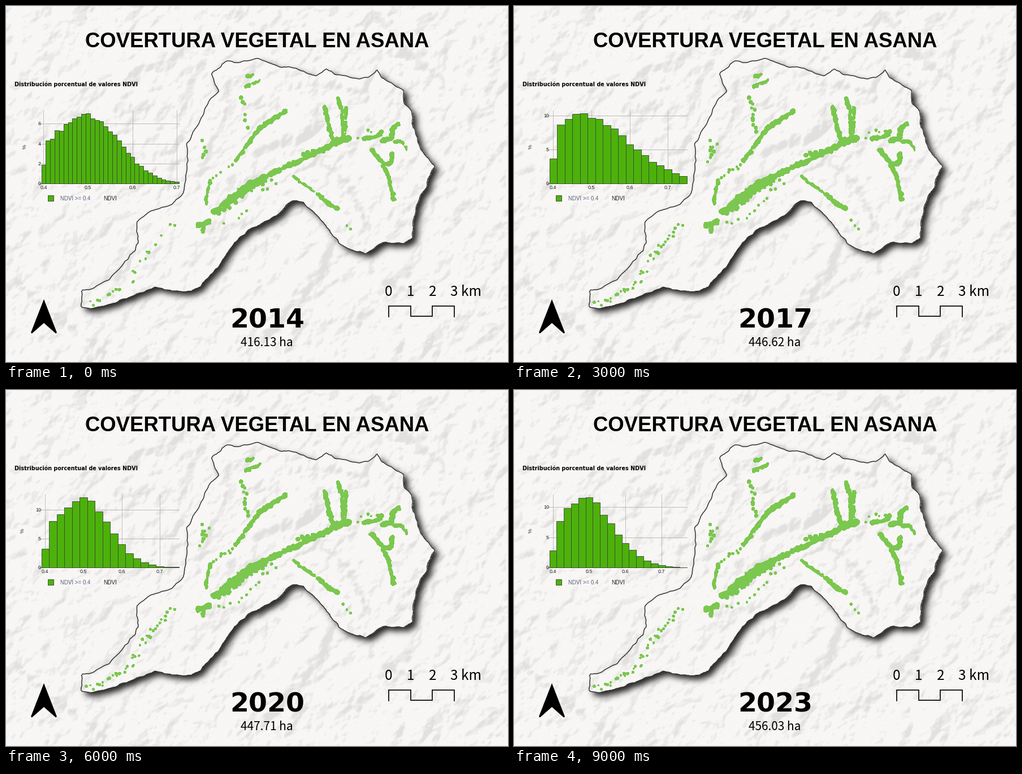
Write a matplotlib script that moves like this. It is 888 px wide and 630 px high and loops after 10000 ms.

```python
import numpy as np
import matplotlib.pyplot as plt
from matplotlib.animation import FuncAnimation
from matplotlib.path import Path
from matplotlib.patches import Polygon, Rectangle

W, H, DPI = 888, 630, 100
PT = 72 / DPI
rng = np.random.default_rng(14)
yy, xx = np.mgrid[0:H, 0:W] + 0.5
fy = np.fft.fftfreq(H)[:, None]
fx = np.fft.fftfreq(W)[None, :]

fig = plt.figure(figsize=(W / DPI, H / DPI), dpi=DPI)
ax = fig.add_axes([0, 0, 1, 1])
ax.set_xlim(0, W)
ax.set_ylim(H, 0)
ax.axis("off")


def text(x, y, s, px, ha="center", font="DejaVu Sans", **kw):
    kw.setdefault("va", "baseline")
    return ax.text(x, y, s, fontsize=px * PT, ha=ha, family=font, **kw)


def line(xs, ys, color="black", px=1.0, **kw):
    return ax.plot(xs, ys, color=color, lw=px * PT, **kw)[0]


def apply(a, gain):
    return np.fft.ifft2(np.fft.fft2(a) * gain).real


def blur(a, sigma):
    return apply(a, np.exp(-2 * (np.pi * sigma) ** 2 * (fx**2 + fy**2)))


def noise(gain):
    n = apply(rng.standard_normal((H, W)), gain)
    return (n - n.mean()) / n.std()


def soft_noise(sigma):
    return noise(np.exp(-2 * (np.pi * sigma) ** 2 * (fx**2 + fy**2)))


def along(pts, step=1.0):
    """Resample a polyline at even steps."""
    p = np.array(pts, float)
    s = np.r_[0, np.cumsum(np.hypot(*np.diff(p, axis=0).T))]
    t = np.arange(0, s[-1], step)
    return np.column_stack([np.interp(t, s, c) for c in p.T])


def stamp(field, x, y, r):
    """Raise field to r minus the distance from (x, y)."""
    m = int(r + 8)
    x0, y0 = int(x), int(y)
    win = np.s_[max(y0 - m, 0):max(y0 + m, 0), max(x0 - m, 0):max(x0 + m, 0)]
    d = np.hypot(xx[win] - x, yy[win] - y)
    field[win] = np.maximum(field[win], r - d)


# ---------- relief ----------
def relief():
    fd, fp = (fx - fy) / 2**0.5, (fx + fy) / 2**0.5
    f = np.sqrt((1.3 * fd) ** 2 + fp**2) + 0.006
    height = -np.abs(noise(f**-2.3)) - 0.5 * np.abs(noise(f**-2.1))
    gy, gx = np.gradient(blur(height, 1.3))
    shade = gx + gy
    shade /= shade.std()
    valley = np.zeros((H, W))
    for path in (
        [(345, 100), (318, 155), (240, 225)],
        [(312, 235), (285, 290), (180, 340)],
        [(392, 125), (390, 190), (350, 265), (340, 320)],
        [(250, 400), (215, 460), (150, 495)],
        [(520, 155), (560, 135), (620, 150)],
        [(575, 180), (545, 225), (440, 260), (395, 310)],
        [(560, 280), (600, 310), (640, 390)],
        [(570, 440), (530, 510), (495, 625)],
        [(640, 450), (655, 480), (720, 510)],
        [(650, 10), (700, 80), (770, 130)],
        [(20, 490), (90, 550), (170, 610)],
    ):
        for x, y in along(path, 3):
            stamp(valley, x, y, 11)
    v = shade + 0.16 * valley
    tones = np.array([248, 242, 235, 226])
    img = blur(tones[np.digitize(v, [0.5, 1.0, 1.9])], 0.5)
    warm = np.array([0, 1, 2.5])
    return (img[..., None] - warm) / 255


# ---------- basin ----------
outline = [
    (363, 121), (390, 97), (405, 100), (446, 93), (488, 110), (500, 107),
    (549, 124), (567, 111), (582, 121), (622, 129), (646, 124), (656, 112),
    (665, 127), (703, 148), (704, 172), (718, 185), (718, 207), (734, 254),
    (758, 284), (746, 305), (745, 318), (732, 337), (721, 375), (718, 411),
    (705, 420), (667, 418), (637, 438), (605, 430), (590, 421), (555, 376),
    (526, 348), (513, 343), (500, 350), (480, 370), (430, 396), (405, 418),
    (375, 462), (343, 497), (327, 505), (300, 506), (264, 498), (195, 524),
    (150, 536), (133, 533), (135, 503), (150, 501), (183, 484), (229, 432),
    (234, 418), (231, 383), (255, 363), (292, 352), (313, 333), (321, 285),
    (320, 245), (350, 190), (360, 165), (377, 152), (363, 121),
]
edge = along(outline, 3)
wobble = rng.standard_normal(edge.shape)
edge += 0.35 * (wobble + np.roll(wobble, 1, 0) + np.roll(wobble, 2, 0))
inside = Path(edge).contains_points(
    np.column_stack([xx.ravel(), yy.ravel()])).reshape(H, W)
shadow = np.roll(blur(inside.astype(float), 5.5), (7, 7), (0, 1))
shadow = (np.clip(shadow * 1.05, 0, 0.95) * ~inside)[..., None]
land = relief() * (1 - shadow) + 0.17 * shadow
ax.imshow(land.clip(0, 1), extent=(0, W, H, 0), interpolation="nearest",
          aspect="auto")
ax.add_patch(Polygon(edge, fill=False, ec="#333333", lw=1.5 * PT,
                     joinstyle="round"))

# ---------- vegetation ----------
cover = np.full((H, W), -9.0)
dots = []


def stroke(r, *pts):
    for x, y in along(pts):
        stamp(cover, x, y, r)


def scatter(n, spread, *path, size=2.0):
    """Dots near a path, each with the density at which it shows."""
    p = along(path)
    for k, t in enumerate(rng.permutation(n) / n):
        x, y = p[int((k + 0.5) / n * len(p))] + rng.normal(0, spread, 2)
        dots.append((x, y, size * rng.uniform(0.7, 1.3), t))


# main valley
stroke(4.5, (339, 388), (360, 382))
stroke(3, (350, 390), (349, 399))
stroke(4.5, (368, 366), (400, 338), (430, 314), (485, 290), (530, 269), (575, 247))
stroke(6, (388, 352), (412, 332), (450, 308))
stroke(6, (578, 242), (604, 234))
scatter(16, 2, (375, 366), (405, 352), (425, 330), (470, 304), size=3.2)
scatter(6, 2, (515, 265), (550, 254), size=3.4)
# north fingers
stroke(4, (564, 180), (571, 210), (578, 238))
stroke(3, (588, 164), (595, 190), (597, 230))
stroke(3, (602, 181), (600, 225))
# east
stroke(3, (632, 235), (658, 231), (664, 222))
stroke(4, (666, 238), (682, 235), (684, 218), (693, 209))
stroke(2, (688, 239), (702, 242), (709, 255))
stroke(3.5, (648, 255), (669, 281), (682, 278), (683, 260))
stroke(3.2, (669, 285), (677, 305), (686, 343))
# south-east and north-west branches
stroke(2, (508, 302), (531, 318), (557, 337))
stroke(4, (560, 340), (574, 352), (587, 358))
stroke(3.6, (406, 274), (434, 235), (450, 214), (495, 186))
stroke(2.6, (424, 142), (449, 133))
stroke(3, (427, 126), (436, 122))
stroke(2.2, (361, 309), (356, 330), (354, 352))
# scattered patches
scatter(3, 1, (592, 375), (612, 399), size=2.4)
scatter(40, 3, (140, 526), (186, 510), (222, 487), (246, 442), (298, 386))
scatter(10, 4, (352, 238), (347, 270), (364, 240), size=2.5)
scatter(11, 2, (416, 160), (422, 190), (428, 225), size=3)
scatter(9, 2, (362, 307), (383, 293), (403, 280))
scatter(13, 4, (365, 388), (420, 366), (475, 312))
scatter(8, 3, (620, 232), (655, 214), (668, 240))

grain = 0.9 * soft_noise(1.8)


def vegetation(area):
    field = cover + grain + 0.25 * soft_noise(2) + (area - 430) / 80
    for x, y, r, t in dots:
        if t < (area - 380) / 70:
            stamp(field, x, y, r)
    win = np.s_[112:545, 125:715]
    return ax.contourf(xx[win], yy[win], field[win], levels=[0, 60],
                       colors=["#7bc74f"], zorder=2)


# ---------- histogram ----------
X0, X1, Y0, TOP = 62.5, 306, 314, 184
GRID, BAR, RIM = "#b4b4b4", "#4db10c", "#3c4a36"


def spread_of(bins, peak, mode, rise, fall, power):
    """Skewed bell over the bins; the first bin is only half covered."""
    d = np.arange(bins) / bins - mode
    bell = np.where(d < 0, np.exp(-(np.abs(d) / rise) ** 2),
                    np.exp(-(np.abs(d) / fall) ** power))
    bell *= rng.uniform(0.95, 1.05, bins)
    bell[0] /= 2
    return bell * peak / bell.max()


def chart(vals):
    small = dict(px=9, font="Liberation Sans", color="#222222")
    out = []
    n, peak = len(vals), vals.max()
    w, unit = (X1 - X0) / n, 124 / peak
    step = 2 if peak < 10 else 5
    per_tenth = 10 if n > 25 else 5
    for k in range(0, n, per_tenth):
        x = X0 + w * (k + 0.5)
        out.append(line([x, x], [TOP, Y0], GRID, 0.8))
        out.append(text(x, 324, f"{0.4 + k / per_tenth / 10:.1f}", **small))
    for v in range(0, int(peak) + 1, step):
        y = Y0 - v * unit
        out.append(line([X0 - 4, X1], [y, y], GRID if v else "#444444", 0.9))
        out.append(text(62, y + 3, str(v), ha="right", **small))
    for k, v in enumerate(vals):
        out.append(ax.add_patch(Rectangle(
            (X0 + k * w, Y0 - v * unit), w, v * unit, fc=BAR, ec=RIM,
            lw=0.9 * PT, zorder=3)))
    out.append(text(33 if step == 2 else 29, 249, "%", rotation=90,
                    va="center", **small))
    return out


# hectares, then bins, peak, mode, rise, fall, power of the histogram
years = [
    (416.13, 31, 7.05, 0.32, 0.42, 0.33, 2),
    (430.25, 18, 10.7, 0.17, 0.26, 0.45, 2),
    (444.36, 18, 10.85, 0.17, 0.26, 0.46, 2),
    (446.62, 18, 10.3, 0.20, 0.35, 0.50, 2),
    (448.87, 18, 9.25, 0.24, 0.70, 0.46, 2.3),
    (405.85, 17, 17.9, 0.18, 0.15, 0.25, 1.2),
    (447.71, 18, 12.2, 0.28, 0.36, 0.26, 1.8),
    (422.99, 18, 13.8, 0.20, 0.25, 0.30, 1.8),
    (398.27, 17, 18.5, 0.18, 0.15, 0.25, 1.3),
    (456.03, 19, 11.6, 0.21, 0.25, 0.31, 2),
]
scenes = []
for i, (area, *shape) in enumerate(years):
    scenes.append(chart(spread_of(*shape)) + [
        vegetation(area),
        text(462, 570, str(2014 + i), 47.5, weight="bold"),
        text(461, 602, f"{area:.2f} ha", 20.9, font="Noto Sans CJK JP"),
    ])

# ---------- fixed labels ----------
text(444, 73, "COVERTURA VEGETAL EN ASANA", 36.5, font="Liberation Sans",
     weight="bold")
text(15, 142, "Distribución porcentual de valores NDVI", 9.6, ha="left",
     weight="bold")
ax.add_patch(Rectangle((74, 334.5), 10, 10, fc=BAR, ec=RIM, lw=0.9 * PT))
text(96, 343.5, "NDVI >= 0.4", 9.8, ha="left", font="Liberation Sans",
     color="#56607a")
text(172, 344.5, "NDVI", 10, ha="left", font="Liberation Sans", color="#222222")
for k in range(3):
    text(676.5 + 39 * k, 513, str(k), 24.3, font="Noto Sans CJK JP")
text(786, 513, "3 km", 24.3, ha="left", font="Noto Sans CJK JP")
line(np.repeat(677 + 38.7 * np.arange(4), 2),
     [550, 531, 531, 549, 549, 531, 531, 550], px=1.7, solid_joinstyle="miter")
ax.add_patch(Polygon([(67, 519), (90, 578), (88, 579.5), (67, 561),
                      (46, 579.5), (44, 578)], fc="black", lw=0))


def update(i):
    for k, scene in enumerate(scenes):
        for artist in scene:
            artist.set_visible(k == i)
    return []


update(0)
anim = FuncAnimation(fig, update, frames=len(scenes), interval=1000,
                     init_func=lambda: update(0), repeat=True, repeat_delay=0)
plt.show()
```
